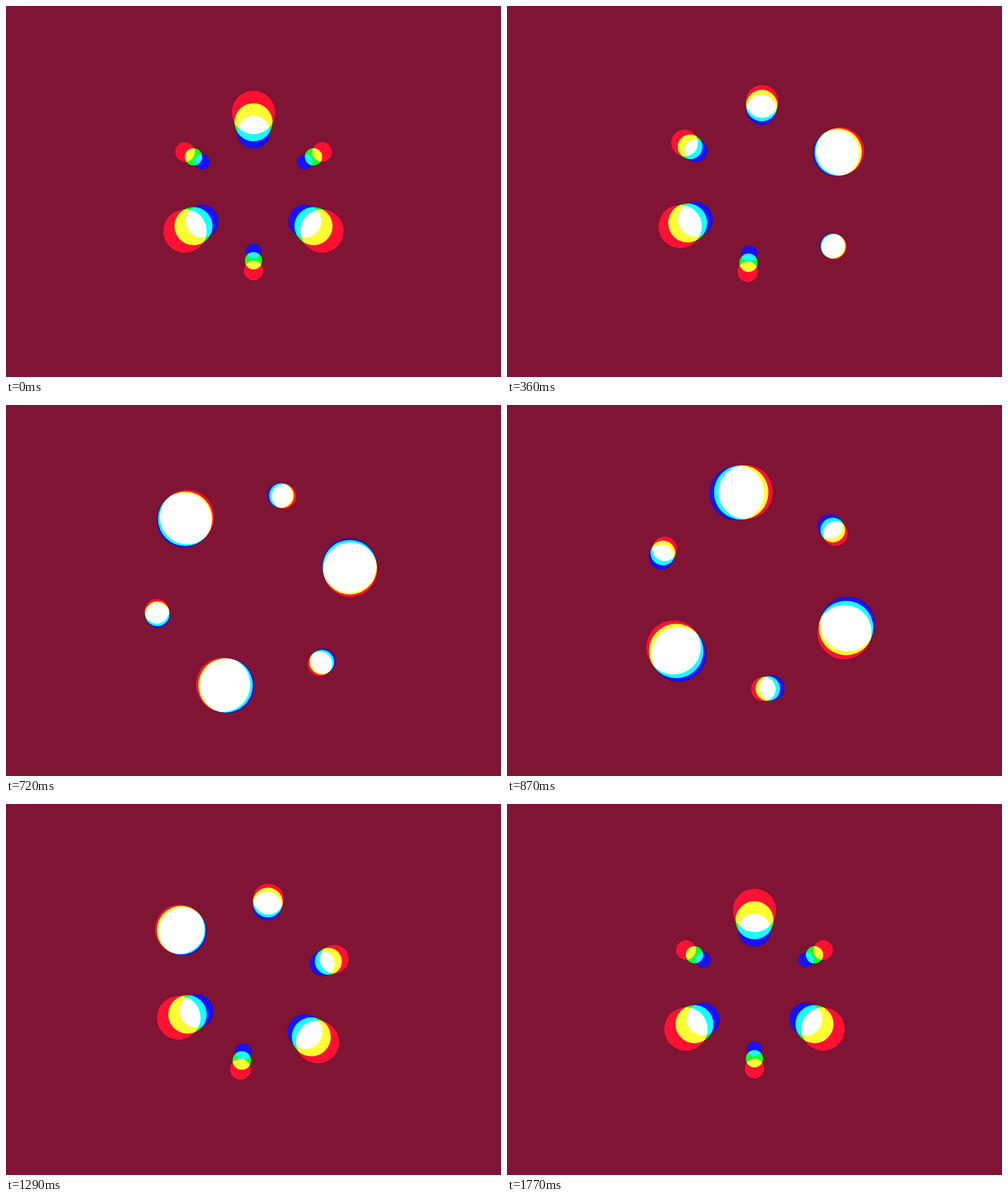
An HTML page with a canvas that plays this animation: 800x600 px, repeating every 1800 ms.

```html
<!DOCTYPE html>
<html lang="en">
<head>
<meta charset="utf-8">
<title>Six dots</title>
<style>
  html, body { margin: 0; width: 100%; height: 100%; overflow: hidden; background: #801434; }
  canvas { display: block; width: 800px; height: 600px; }
</style>
</head>
<body>
<canvas id="stage" width="800" height="600"></canvas>
<script>
const ctx = document.getElementById('stage').getContext('2d');
const LOOP = 1800, STEP = 30, COUNT = 6;
const RING = 160, BIG = 44, SMALL = 20;
const BACK = '#801434', INK = 'rgb(24,17,50)';

// Each light adds one channel on top of the ink colour.
const LIGHTS = [
  { color: 'rgb(231,0,0)', rest: 0.8, power: 12 },
  { color: 'rgb(0,238,0)', rest: 0.7, power: 14 },
  { color: 'rgb(0,0,205)', rest: 0.6, power: 16 }
];

const mix = (a, b, k) => a + (b - a) * k;
const ease = (p, g) => p < 0.5 ? 0.5 * (2 * p) ** g : 1 - 0.5 * (2 - 2 * p) ** g;
const upDown = p => 1 - Math.abs(2 * (p - Math.floor(p)) - 1);

function dot(light, i, p) {
  const phase = upDown(p + 0.08 * (COUNT - i) / COUNT);
  const scale = mix(light.rest, 1, ease(phase, 12));
  const [from, to] = i % 2 ? [SMALL, BIG] : [BIG, SMALL];
  const turn = 120 - 60 * i + 15 * ease(upDown(p), 2) + 120 * ease(p, light.power);
  const a = turn * Math.PI / 180;
  return {
    color: light.color,
    x: 400 + RING * scale * Math.sin(a),
    y: 300 - RING * scale * Math.cos(a),
    r: scale * mix(from, to, ease(phase, 20))
  };
}

function disc(x, y, r, color) {
  ctx.fillStyle = color;
  ctx.beginPath();
  ctx.arc(x, y, r, 0, Math.PI * 2);
  ctx.fill();
}

function draw(p) {
  const dots = [];
  for (const light of LIGHTS)
    for (let i = 0; i < COUNT; i++) dots.push(dot(light, i, p));

  ctx.globalCompositeOperation = 'source-over';
  ctx.fillStyle = BACK;
  ctx.fillRect(0, 0, 800, 600);
  // The slightly larger ink discs leave a thin dark rim.
  for (const d of dots) disc(d.x, d.y, d.r + 0.35, INK);
  ctx.globalCompositeOperation = 'lighter';
  for (const d of dots) disc(d.x, d.y, d.r, d.color);
}

const start = performance.now();
function tick() {
  const t = Math.max(0, performance.now() - start) % LOOP;
  draw(Math.floor(t / STEP) * STEP / LOOP);
  requestAnimationFrame(tick);
}
tick();
</script>
</body>
</html>
```
